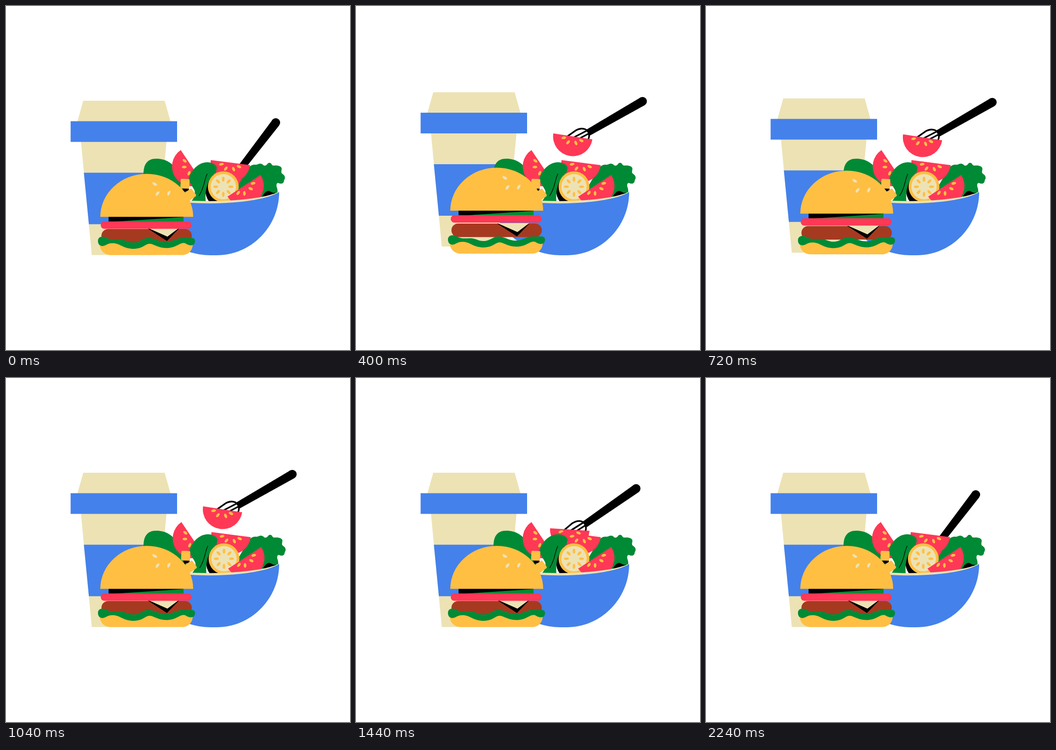
Animation, 748 px wide and 748 px high, one loop 2.28 s. Source, as an HTML page:

```html
<!DOCTYPE html>
<html lang="en">
<head>
<meta charset="utf-8">
<title>Takeaway lunch</title>
<style>
html, body { margin: 0; width: 100%; height: 100%; overflow: hidden; background: #fff; }
svg { display: block; width: 100%; height: 100%; }
.blue { fill: #4481eb; }
.cream { fill: #ede2b4; }
.bun { fill: #ffbf43; }
.green { fill: #008a35; }
.red { fill: #ff3856; }
.patty { fill: #a63a20; }
</style>
</head>
<body>
<svg viewBox="0 0 748 748">
  <defs>
    <ellipse id="seed" class="bun" rx="5.200" ry="2.900"/>
    <g id="tomato">
      <path class="red" d="M-43 0H43A43 43 0 0 1-43 0Z"/>
      <use href="#seed" transform="translate(-19 6) rotate(-19)"/>
      <use href="#seed" transform="translate(-8.300 14.200) rotate(-58)"/>
      <use href="#seed" transform="translate(8.700 13.200) rotate(58)"/>
      <use href="#seed" transform="translate(19.500 6.300) rotate(19)"/>
    </g>
    <path id="sesame" class="cream" d="M-5-4C1-4 6 0 5 3C3 5-5 4-5-4Z"/>
  </defs>

  <g id="cup">
    <path class="cream" d="M168 206H345L358 252H155ZM163 295H349L326 541.5H186.500Z"/>
    <path class="blue" d="M140.500 250.500H372V295.500H140.500ZM169.300 362.500H342.800L332.300 474.500H180.200Z"/>
  </g>

  <path class="green" d="M299 370C298 345 306 332 327 332C346 332 362 340 378 364L400 425H310Z"/>

  <g id="fork">
    <path d="M456 286L478 270.500C490 264 501 266 505.500 275C508 281 507 286 505 290M473 286L502 271M486 288L505 278" fill="none" stroke="#000" stroke-width="3.600" stroke-linecap="round"/>
    <path d="M628 215.500L618.500 199L501.500 268.500L509 281.500Z"/>
    <circle cx="623" cy="207.200" r="9.500"/>
    <use href="#tomato" transform="translate(471.500 283.500) rotate(8.700)"/>
  </g>

  <g id="salad">
    <path d="M380 384H399V402L388 404Z"/>
    <use href="#tomato" transform="translate(405.500 349) rotate(56)"/>
    <path class="green" d="M500 425L505 392L520 366C526 350 536 344 543 345C548 346 551 342 556 343C561 344 561 348 565 347C570 346 570 340 575 341C580 342 578 347 584 347C592 346 602 348 601 355C600 361 599 363 604 366C609 370 609 375 606 379C606 386 600 388 594 385C590 384 589 389 590 393C592 398 592 402 592 406L560 425Z"/>
    <path d="M556 418C563 408 566 402 573 402C578 403 579 407 587 406L580 425H556Z"/>
    <use href="#tomato" transform="translate(489.500 340.500) rotate(7.400)"/>
    <ellipse cx="463" cy="400" rx="28" ry="36"/>
    <path class="green" d="M398 378C405 352 425 338 442 340C452 341 459 346 460 352L458 362C442 375 433 395 436 427H402C412 417 414 408 411 400Z"/>
    <path d="M439 365C431 381 434 393 421 413" fill="none" stroke="#000" stroke-width="1.200"/>
    <g id="cucumber" transform="translate(474 393)">
      <circle class="bun" r="33.500"/>
      <circle class="cream" r="27.500"/>
    </g>
    <use href="#tomato" transform="translate(519 391) rotate(-33.300)"/>
    <rect class="bun" x="381" y="376" width="19.500" height="21" rx="3" transform="rotate(2 390 386)"/>
    <rect class="bun" x="392" y="400" width="20" height="20" rx="3" transform="rotate(-36 402 410)"/>
  </g>

  <path class="cream" d="M290 404C345 431 539 431 594 403.500V406C534 440 350 440 290 404Z"/>
  <path class="blue" d="M290 404C344 437.500 540 437.500 594 404.500C594 480 533 542 458 542H444C385 542 300 500 290 404Z"/>

  <g class="layer">
    <path class="bun" d="M204 515H406V518C406 532 396 541.500 383 541.500H228C214 541.500 204 532 204 518Z"/>
  </g>
  <g class="layer">
    <rect class="patty" x="207.500" y="485" width="196.500" height="29.500" rx="14.700"/>
  </g>
  <g class="layer">
    <path d="M307 483H377L350 511Z"/>
    <path class="cream" d="M307 482H377L351 501.500Z"/>
  </g>
  <g class="layer">
    <path class="green" d="M200 511C200 500 212 500 219 504C229 510 238 508 248 508C262 508 266 515 280 514C294 512 298 504 311 504C326 506 334 514 350 513C366 511 372 504 386 504C398 505 411 501 411 511C411 522 400 523 390 516C382 513 374 521 364 524C344 530 330 523 318 518C304 513 302 527 278 528C256 528 250 518 236 516C222 514 218 521 210 522C204 522 200 518 200 511Z"/>
  </g>
  <g class="layer">
    <path d="M223 458H386V469H223Z"/>
    <path class="green" d="M236 469L386 459V469Z"/>
  </g>
  <g class="layer">
    <rect class="red" x="206" y="468.500" width="197.500" height="16" rx="8"/>
  </g>
  <g class="layer">
    <path class="bun" d="M205 458.500A101 93.500 0 0 1 407 458.500Z"/>
    <use href="#sesame" transform="translate(323.500 387)"/>
    <use href="#sesame" transform="translate(329.500 408) rotate(95)"/>
    <use href="#sesame" transform="translate(354 407) rotate(85)"/>
  </g>
</svg>
<script>
const LOOP = 2280, STEP = 40;
const get = id => document.getElementById(id);
const shift = (el, x, y) => el.setAttribute('transform', `translate(${x} ${y})`);

for (let a = 0; a < 360; a += 45) {
  get('cucumber').insertAdjacentHTML('beforeend',
    `<ellipse class="bun" cx="16.500" rx="5.500" ry="2.800" transform="rotate(${a})"/>`);
}

// Smooth curve through [time, value] keys that never overshoots them.
function curve(keys) {
  const rate = i => (keys[i + 1][1] - keys[i][1]) / (keys[i + 1][0] - keys[i][0]);
  const slope = i => {
    if (i === 0 || i === keys.length - 1) return 0;
    const a = rate(i - 1), b = rate(i);
    return a * b > 0 ? 2 * a * b / (a + b) : 0;
  };
  return t => {
    const i = keys.findIndex((k, n) => n < keys.length - 1 && t < keys[n + 1][0]);
    if (i < 0) return keys[keys.length - 1][1];
    const [t0, v0] = keys[i], [t1, v1] = keys[i + 1];
    const d = t1 - t0, u = (t - t0) / d, w = 1 - u;
    return v0 * w * w * (1 + 2 * u) + v1 * u * u * (3 - 2 * u)
      + d * u * w * (slope(i) * w - slope(i + 1) * u);
  };
}
const through = (times, values) => curve(times.map((t, i) => [t, values[i]]));

const cupY = through([0, 200, 310, 400, 560, 720, 1040], [0, -10, -23, -18.5, -8, -5, 0]);

// Lift of each burger layer at 200, 400 and 720 ms, from the bottom up.
const lifts = [
  [-6, -3, -1.5],
  [-17, -12, -6.5],
  [-14, -10, -5],
  [-6, -3, -1.5],
  [-28.5, -13.5, -7],
  [-21.5, -13.5, -7],
  [-36, -13.5, -7]
].map(v => through([0, 200, 400, 720, 1040], [0, ...v, 0]));
const layers = document.querySelectorAll('.layer');

const forkTimes = [0, 200, 400, 600, 1120, 1220, 1440, 1660];
const forkX = through(forkTimes, [587, 610, 624, 623.5, 623.5, 626, 610, 587]);
const forkY = through(forkTimes, [252, 215, 206, 208, 208, 206, 239, 252]);
const forkTilt = through(forkTimes, [-22.6, -11.6, 0, 0, 0, 0.6, -5, -22.6]);

const saladX = through([0, 160, 1720, 2200], [-1.5, 0, 0, -1.5]);

function draw(t) {
  shift(get('cup'), 0, cupY(t));
  layers.forEach((el, i) => shift(el, 0, lifts[i](t)));
  shift(get('salad'), saladX(t), 0);
  get('fork').setAttribute('transform',
    `translate(${forkX(t)} ${forkY(t)}) rotate(${forkTilt(t)}) translate(-624 -206)`);
}

const start = performance.now();
function tick() {
  const t = (performance.now() - start) % LOOP;
  draw(Math.floor(t / STEP) * STEP);
  requestAnimationFrame(tick);
}
tick();
</script>
</body>
</html>
```
